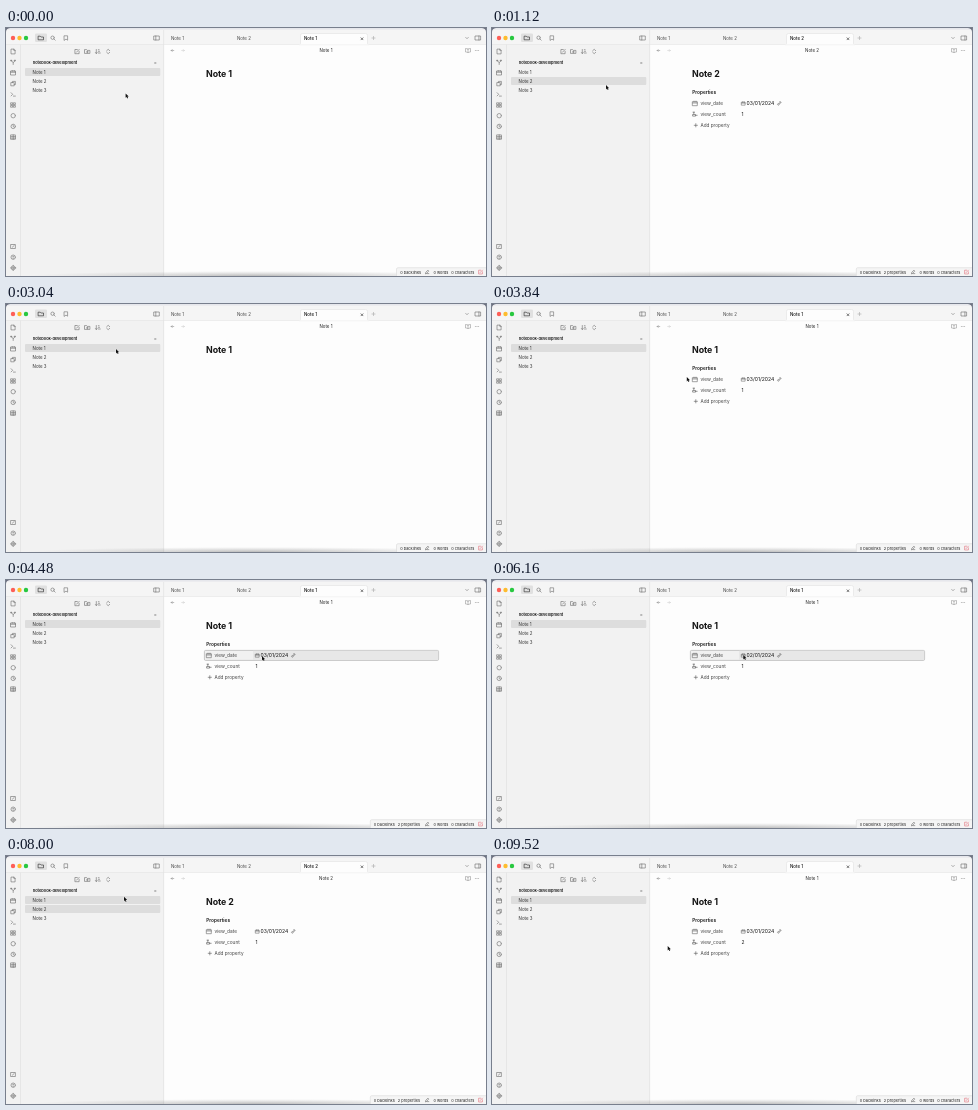
These frames come from a looping animation (480 px wide and 248 px high, 9.68 s). An HTML page:

```html
<!DOCTYPE html>
<html lang="en">
<head>
<meta charset="utf-8">
<title>Notes</title>
<style>
html, body { margin: 0; width: 100%; height: 100%; overflow: hidden; background: #fff; }
svg { display: block; width: 480px; height: 248px; font-family: Inter, sans-serif; }
text { white-space: pre; }
</style>
</head>
<body>
<svg id="stage" viewBox="0 0 480 248">
  <defs>
    <radialGradient id="shade">
      <stop offset="0" stop-color="#777" stop-opacity=".5"/>
      <stop offset=".5" stop-color="#888" stop-opacity=".25"/>
      <stop offset="1" stop-color="#999" stop-opacity="0"/>
    </radialGradient>
  </defs>
</svg>
<script>
const LOOP = 9680, STEP = 80;
const stage = document.getElementById('stage');

function add(tag, attrs, parent = stage) {
  const el = document.createElementNS('http://www.w3.org/2000/svg', tag);
  for (const key in attrs) el.setAttribute(key, attrs[key]);
  parent.appendChild(el);
  return el;
}
const group = () => add('g', {});
const rect = (x, y, width, height, fill, more = {}, parent) =>
  add('rect', { x, y, width, height, fill, ...more }, parent);
function label(x, y, str, size = 4.4, fill = '#222', weight = 400, parent, anchor = 'start') {
  const el = add('text', { x, y, fill, 'font-size': size, 'font-weight': weight, 'text-anchor': anchor }, parent);
  el.textContent = str;
  return el;
}

// Icon outlines, centred on 0,0
const ICONS = {
  folder: 'M-2.5-1.8h1.7l.8.8h2.5v2.8h-5z',
  search: 'M1.3-.3a1.7 1.7 0 1 1-3.4 0a1.7 1.7 0 1 1 3.4 0M.9.9L2.2 2.2',
  bookmark: 'M-1.6-2.2h3.2v4.4L0 1.1-1.6 2.2z',
  panelLeft: 'M-2.6-2h5.2v4h-5.2zM-.9-2v4',
  panelRight: 'M-2.6-2h5.2v4h-5.2zM.9-2v4',
  edit: 'M.3-2h-2.4v4.2h4.2V-.2M-.5.7L2.2-2.1',
  newFolder: 'M-2.5-1.9h1.7l.8.8h2.5v3h-5zM0-.4v1.7M-.9.4h1.8',
  sort: 'M-1.5-2v4M-2.4 1l.9 1 .9-1M.5-1.8h.8M.5-.2h1.3M.5 1.5h2',
  upDown: 'M-1.5-.8L0-2.2 1.5-.8M-1.5.8L0 2.2 1.5.8',
  cross: 'M-1-1L1 1M1-1L-1 1',
  plus: 'M-1.6 0h3.2M0-1.6v3.2',
  chevron: 'M-1.3-.6L0 .7 1.3-.6',
  left: 'M1.6 0h-3.2M-.3-1.3L-1.6 0-.3 1.3',
  right: 'M-1.6 0h3.2M.3-1.3L1.6 0 .3 1.3',
  book: 'M0-1.4v3.4M0-1.4q-1-.6-2.5-.6v3.5q1.5 0 2.5.6 1-.6 2.5-.6v-3.5q-1.5 0-2.5.6',
  dots: 'M-1.7 0h.4M-.2 0h.4M1.3 0h.4',
  file: 'M-1.8-2.4h2.4l1.3 1.3v3.5h-3.7zM.6-2.4v1.3h1.3',
  graph: 'M-1.9-1.5L0 .3 1.9-1.5M0 .3v2M-2.2-2h.8v.8h-.8zM1.4-2h.8v.8h-.8z',
  calendar: 'M-2.3-1.9h4.6v4h-4.6zM-2.3-.6h4.6M-1-2.5v1M1-2.5v1',
  copy: 'M-2-1h3v3.2h-3zM-.8-1v-1.2h3v3.2h-1.2',
  prompt: 'M-2.1-1.6L-.5 0l-1.6 1.6M.2 1.8h2',
  grid: 'M-2.2-2.2h1.7v1.7h-1.7zM.5-2.2h1.7v1.7h-1.7zM-2.2.5h1.7v1.7h-1.7zM.5.5h1.7v1.7h-1.7z',
  ring: 'M2.2 0a2.2 2.2 0 1 1-4.4 0a2.2 2.2 0 1 1 4.4 0',
  clock: 'M2.2 0a2.2 2.2 0 1 1-4.4 0a2.2 2.2 0 1 1 4.4 0M0-1.2V.2L1 .8',
  help: 'M2.2 0a2.2 2.2 0 1 1-4.4 0a2.2 2.2 0 1 1 4.4 0M-.7-.6q.7-1 1.3 0 0 .5-.6.8M0 1.2v.2',
  gear: 'M2 0a2 2 0 1 1-4 0a2 2 0 1 1 4 0M.8 0a.8.8 0 1 1-1.6 0a.8.8 0 1 1 1.6 0M0-2.6v.6M0 2v.6M-2.6 0h.6M2 0h.6',
  table: 'M-2.2-2.2h4.4v4.4h-4.4zM-2.2-.5h4.4M-2.2 1h4.4M0-2.2v4.4',
  box: 'M-2.2-2h4.4v4h-4.4zM-.8.6l1.8-1.6',
  count: 'M-2-1.8h1.6M-1.2-1.8v1.6M-2 .5h2.6v1.6h-2.6zM.6 1.3h1.6',
  link: 'M-.7.7L.9-.9M-.1-1.3l.7-.6q1.2-.3 1.3 1l-.9 1M.1 1.3l-.7.6q-1.2.3-1.3-1l.9-1',
  pencil: 'M-1.6 1.7l.3-1.4L1-2l1 1-2.3 2.3zM0 1.8h2'
};
function icon(name, x, y, color = '#6a6a6a', scale = 1, parent) {
  return add('path', {
    d: ICONS[name], transform: `translate(${x} ${y}) scale(${scale})`,
    fill: 'none', stroke: color, 'stroke-width': .6,
    'stroke-linecap': 'round', 'stroke-linejoin': 'round'
  }, parent);
}

// Window
rect(0, 0, 480, 248, '#fdfdfd');
rect(0, 0, 158, 248, '#f2f2f2');
rect(0, 0, 480, 16.5, '#f5f5f5');
rect(0, 0, 480, 1.6, '#e6e7ec');
add('path', { d: 'M0 0h4Q0 .5 0 4zM480 0h-4q4 .5 4 4z', fill: '#6c7080' });
rect(14.2, 16.5, .6, 231.5, '#dedede');
rect(157.5, 2, .6, 246, '#dedede');
rect(0, 16.2, 480, .5, '#e0e0e0');
['#fe5f57', '#febc2e', '#28c840'].forEach((fill, i) =>
  add('circle', { cx: 7 + i * 6.5, cy: 10, r: 2.2, fill }));

// Toolbar and tabs
rect(29, 5.5, 12, 8.5, '#e0e0e0', { rx: 1.3 });
icon('folder', 35, 10, '#222');
icon('search', 47, 10);
icon('bookmark', 60, 10);
icon('panelLeft', 150.7, 10);
label(165, 12.2, 'Note 1', 4.4, '#444');
label(231, 12.2, 'Note 2', 4.4, '#444');
add('path', { d: 'M293 16.8q1.5 0 1.5-1.5V7.5q0-2 2-2h63q2 0 2 2v7.8q0 1.5 1.5 1.5z', fill: '#fdfdfd', stroke: '#dcdcdc', 'stroke-width': .5 });
rect(293, 16.5, 70, 1, '#fdfdfd');
const tabText = label(298, 12.2, '', 4.4, '#111', 500);
icon('cross', 356, 10.8, '#222');
icon('plus', 367.5, 10, '#aaa');
icon('chevron', 461, 10, '#777');
icon('panelRight', 472, 10);
icon('left', 166.5, 22.5, '#777', .8);
icon('right', 177, 22.5, '#c4c4c4', .8);
const pathText = label(320, 24.2, '', 4.4, '#222', 400, stage, 'middle');
icon('book', 462, 22.5, '#999');
icon('dots', 471, 22.5, '#999');

// Ribbon and file list
['file', 'graph', 'calendar', 'copy', 'prompt', 'grid', 'ring', 'clock', 'table']
  .forEach((name, i) => icon(name, 7.2, 23.5 + i * 10.7));
['box', 'help', 'gear'].forEach((name, i) => icon(name, 7.2, 218.5 + i * 10.7));
['edit', 'newFolder', 'sort', 'upDown'].forEach((name, i) => icon(name, 71 + i * 10.4, 23.5));
label(26.8, 36.4, 'notebook-development', 3.95, '#111', 600);
icon('cross', 149.3, 35, '#333', .6);
const rows = [0, 1, 2].map(i => {
  const bar = rect(19, 40 + i * 9, 135.3, 8, '#dddddd', { rx: 1 });
  label(26.6, 45.6 + i * 9, 'Note ' + (i + 1), 4.4, '#2c2c2c');
  return bar;
});

// Note page
const heading = label(200.1, 49.1, '', 8.8, '#151515', 700);
heading.setAttribute('letter-spacing', -.1);
const props = group();
label(200.2, 65.6, 'Properties', 4.75, '#151515', 600, props);
const field = group();
props.appendChild(field);
const fieldBox = rect(198.4, 70.4, 234.2, 10, '#f1f1f1', { rx: 1.2, stroke: '#b0b0b0', 'stroke-width': .7 }, field);
const fieldValue = rect(247, 70.8, 185.2, 9.2, '#e7e7e7', {}, field);
icon('calendar', 203, 75.6, '#666', 1, props);
label(208.5, 77.2, 'view_date', 4.75, '#444', 400, props);
icon('calendar', 251.4, 75.6, '#444', .75, props);
const dateText = label(254.6, 77.2, '', 5.05, '#111', 400, props);
icon('link', 287.3, 75.4, '#555', .9, props);
icon('count', 203, 86, '#555', 1, props);
label(208.5, 87.6, 'view_count', 4.75, '#444', 400, props);
const countText = label(249.4, 87.7, '', 4.9, '#111', 400, props);
icon('plus', 203.8, 97.3, '#555', 1, props);
label(208.5, 99, 'Add property', 4.65, '#444', 400, props);

// Window shadow and status bar
rect(20, 243, 460, 10, 'url(#shade)');
const status = rect(364, 239.7, 120, 12, '#f5f5f5', { rx: 1.5, stroke: '#d8d8d8', 'stroke-width': .6 });
const links = label(0, 245.6, '0 backlinks', 3.9, '#222');
const propCount = label(391.8, 245.6, '2 properties', 3.9, '#222');
icon('pencil', 421, 244, '#555', .9);
label(427.4, 245.6, '0 words', 3.9, '#222');
label(445.2, 245.6, '0 characters', 3.9, '#222');
icon('edit', 474.5, 244, '#e0606c', .9);

const cursor = add('path', {
  d: 'M0 0v4.4l1-.9.7 1.6.8-.4-.7-1.5h1.4z',
  fill: '#111', stroke: '#fff', 'stroke-width': .4, 'paint-order': 'stroke'
});

// Pointer moves: first step time, number of steps, end point
const START = [119.6, 65.4];
const MOVES = [
  [80, 1, 115, 53], [960, 3, 114, 57], [1200, 2, 113, 61.5],
  [2320, 3, 110, 48.7], [2880, 1, 110, 45], [3440, 4, 183.5, 69],
  [3840, 1, 194.8, 73], [3920, 3, 248, 78], [4320, 3, 256, 76],
  [6160, 1, 251.3, 75], [6240, 3, 172.5, 63], [6640, 5, 117, 52],
  [7920, 2, 118, 40.8], [8080, 1, 118, 41.2], [9280, 4, 175.7, 90]
];
// Time, open note, properties shown
const OPENS = [
  [0, 1, 0], [400, 2, 0], [480, 2, 1], [1680, 3, 1], [2720, 2, 1],
  [3040, 1, 0], [3120, 1, 1], [7200, 2, 1], [8720, 1, 1]
];

function pointer(t) {
  let [x, y] = START;
  for (const [from, steps, tx, ty] of MOVES) {
    if (t < from) break;
    const u = Math.min(1, (t - from + STEP) / (steps * STEP));
    const e = u * u * (3 - 2 * u);
    x += (tx - x) * e;
    y += (ty - y) * e;
  }
  return [x, y];
}
const show = (el, on) => el.setAttribute('visibility', on ? 'inherit' : 'hidden');
const write = (el, str) => { if (el.textContent !== str) el.textContent = str; };

function draw(time) {
  const t = Math.floor((time % LOOP) / STEP) * STEP;
  const [x, y] = pointer(t);
  const [, note, hasProps] = OPENS.filter(o => o[0] <= t).pop();
  cursor.setAttribute('transform', `translate(${x} ${y})`);

  const inList = x > 19 && x < 154 && y > 39.5 && y < 65 && t < 9280;
  const hover = inList ? Math.floor((y - 39.5) / 9) : -1;
  rows.forEach((bar, i) => show(bar, i === note - 1 || i === hover));

  const name = 'Note ' + note;
  [tabText, pathText, heading].forEach(el => write(el, name));
  show(props, hasProps);
  show(propCount, hasProps);
  status.setAttribute('x', hasProps ? 364.3 : 390.5);
  links.setAttribute('x', hasProps ? 367.8 : 394.2);

  const focus = t >= 4400 && t < 7200;
  const over = x > 198 && x < 433 && y > 70 && y < 81;
  show(field, focus || over);
  fieldBox.setAttribute('fill', focus ? '#f1f1f1' : '#fdfdfd');
  show(fieldValue, focus);

  const edited = note === 1 && t >= 5440 && t < 8800;
  write(dateText, edited ? '02/01/2024' : '03/01/2024');
  write(countText, t >= 8800 ? '2' : '1');
}

const begin = performance.now();
function tick() {
  draw(performance.now() - begin);
  requestAnimationFrame(tick);
}
draw(0);
requestAnimationFrame(tick);
</script>
</body>
</html>
```
